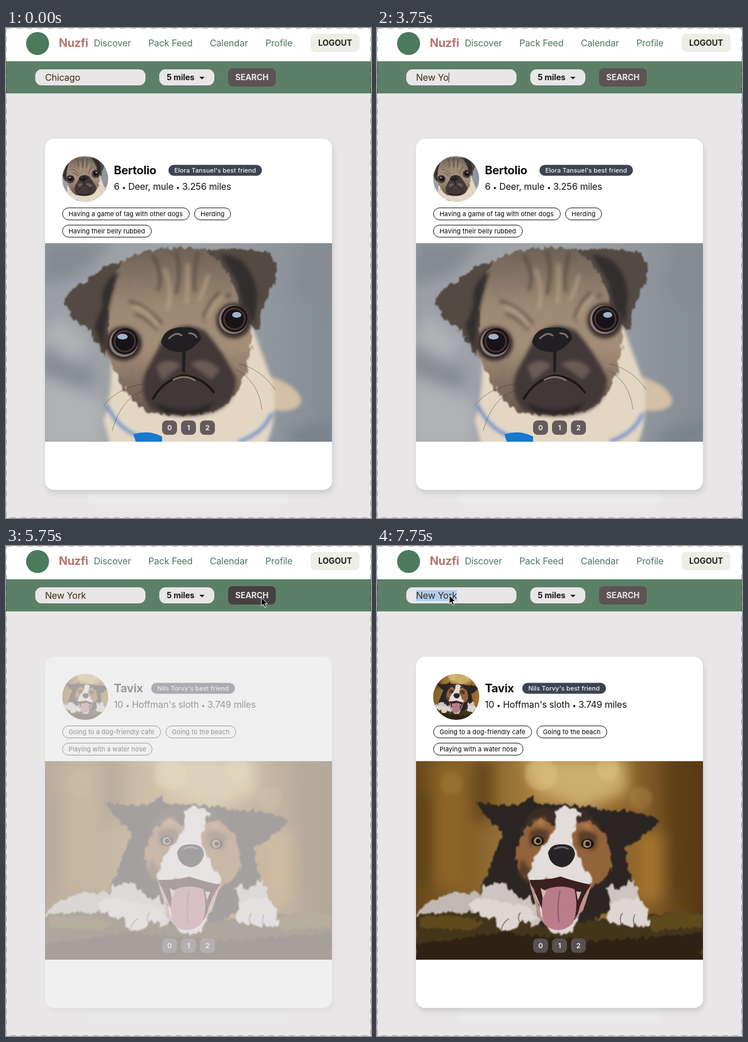
Animation, 636 px wide and 854 px high, one loop 8000 ms. Source, as an HTML page:

```html
<!DOCTYPE html>
<html lang="en">
<head>
<meta charset="utf-8">
<title>Dog finder</title>
<style>
html, body { margin: 0; width: 100%; height: 100%; overflow: hidden; background: #e8e6e7 }
svg { display: block; width: 100%; height: 100% }
text { font: 16px Inter, Roboto, sans-serif; letter-spacing: -.2px; white-space: pre }
.bold { font-size: 14px; font-weight: 700; letter-spacing: -.05px }
.title { font-size: 20px; font-weight: 700; letter-spacing: -.3px }
.small { font-size: 11px; letter-spacing: .1px }
.owner { font-weight: 500 }
.dot { font-size: 12px }
.mid { text-anchor: middle }
</style>
</head>
<body>
<svg viewBox="0 0 636 854">
<defs>
  <filter id="shadow" x="-10%" y="-10%" width="120%" height="120%"><feDropShadow dy="6" stdDeviation="5" flood-opacity=".12"/></filter>
  <filter id="soft" x="-30%" y="-30%" width="160%" height="160%"><feGaussianBlur stdDeviation="3"/></filter>
  <filter id="blur" x="-50%" y="-50%" width="200%" height="200%"><feGaussianBlur stdDeviation="12"/></filter>
  <filter id="hair" color-interpolation-filters="sRGB">
    <feTurbulence type="fractalNoise" baseFrequency=".12 .06" numOctaves="2" seed="4"/>
    <feDisplacementMap in="SourceGraphic" scale="14" xChannelSelector="R" yChannelSelector="G"/>
    <feGaussianBlur stdDeviation="1.2"/>
  </filter>
  <clipPath id="frame"><path d="M68 375h500v346H68z"/></clipPath>
  <clipPath id="round"><circle cx="138" cy="263" r="40"/></clipPath>
  <linearGradient id="street"><stop stop-color="#9b9fa5"/><stop offset=".5" stop-color="#a0a4a9"/><stop offset="1" stop-color="#848c95"/></linearGradient>
  <linearGradient id="forest"><stop stop-color="#69491c"/><stop offset=".45" stop-color="#aa8241"/><stop offset=".75" stop-color="#8c642b"/><stop offset="1" stop-color="#553616"/></linearGradient>
  <linearGradient id="fur" x2="0" y2="1"><stop stop-color="#6d6055"/><stop offset=".35" stop-color="#9c8974"/><stop offset=".6" stop-color="#a48e78"/><stop offset="1" stop-color="#65544a"/></linearGradient>

  <g id="pug" clip-path="url(#frame)">
    <path fill="url(#street)" d="M68 375h500v346H68z"/>
    <g filter="url(#blur)">
      <path fill="#868b93" d="M60 370h130l-60 60-70 20zM60 560l100 40-20 30-80-30zM520 370h60v130l-80-40z"/>
      <path fill="#b0b2b5" d="M60 610l110 40v80H60zM90 500l60 50-30 30-60-40z"/>
      <path fill="#79818a" d="M500 700l70-20v50H480z"/>
    </g>
    <g filter="url(#soft)">
      <path fill="#d3c0a6" d="M455 606q56 16 60 45-10 22-52 14z"/>
      <path fill="#e3d7c4" d="M184 565q0 90-14 118l12 45h270q22-40 13-110l-40-108z"/>
      <path fill="none" stroke="#4a86c8" stroke-width="6" d="M176 658q24 52 80 60M405 721q44-14 58-50"/>
    </g>
    <path fill="#1679cc" d="M222 708q28-8 50 4v12h-45z"/>
    <g filter="url(#hair)">
      <path fill="url(#fur)" d="M200 408q48-26 100-25 72-4 96 45 30 58 30 120-2 84-60 117-60 17-118 4-40-18-60-78-26-36-16-82 2-66 28-101z"/>
      <path fill="#544a44" d="M203 407q-38 4-65 35-33 14-35 36 6 30 38 45 18 20 29 50 12-30 6-76 4-58 27-90zM348 388q65-8 108 4 20 22 12 50-20 36-28 84-28-10-38-60-14-52-54-78z"/>
    </g>
    <g filter="url(#soft)" fill="none" stroke="#4a3f38" stroke-width="5" opacity=".7">
      <path d="M214 476q30 6 58 40M224 498q24 8 40 28M392 465q-34 8-46 46M372 460q-20 20-28 44M256 396q20 36 8 62M296 390q10 36 0 74M335 392q-10 38-6 68"/>
      <path stroke="#c3ad92" d="M222 486q24 4 42 34M380 468q-24 14-30 40M276 420q14 30 6 70M316 410q2 30-2 70M352 430q-4 20-16 46"/>
    </g>
    <path fill="#322d2d" filter="url(#soft)" d="M197 424q-34 20-29 60l-14 35 15 44q8-88 28-139zM374 395q54 0 64 70l-5 48q-22-18-30-70z"/>
    <g filter="url(#soft)">
      <path fill="#41373400" d="M0 0"/>
      <path fill="#433937" d="M275 540q28-34 72-12 32 36 54 82 0 46-42 60-52 10-104-4-26-28-12-66z"/>
      <path fill="#6a5c55" d="M262 590q20-18 42-2l-32 26zM322 586q26-16 50 10l-14 16z"/>
      <path fill="#2c2525" d="M258 652q56 26 106-2l-16 22q-36 8-74 0z"/>
      <ellipse cx="205" cy="550" rx="32" ry="30" fill="#352c29"/>
      <ellipse cx="397" cy="510" rx="31" ry="31" fill="#3d332f"/>
    </g>
    <path fill="#211f22" d="M270 548q6-28 40-26 28-2 30 20-12 16-27 22l-1 36h-5v-35q-28 0-37-17z"/>
    <g fill="none" stroke-linecap="round">
      <path stroke="#1c1819" stroke-width="4" d="M256 646q18-32 54-41 34 5 52 30"/>
      <path stroke="#81746b" stroke-width="3" d="M292 613q19-10 37 1M284 541q13-13 22-5M319 532q10 0 13 7"/>
    </g>
    <g fill="#857a77"><circle cx="205" cy="548" r="25"/><circle cx="396" cy="508" r="25"/></g>
    <g fill="#171319"><circle cx="207" cy="546" r="23"/><circle cx="398" cy="507" r="23"/></g>
    <g fill="none" stroke="#4b342a" stroke-width="3"><circle cx="207" cy="546" r="18"/><circle cx="398" cy="507" r="18"/></g>
    <g fill="#9fb3cc"><ellipse cx="203" cy="538" rx="9" ry="5"/><ellipse cx="402" cy="500" rx="8" ry="5"/></g>
    <path fill="none" stroke="#332c2b" stroke-width=".7" opacity=".7" d="M242 620q-46 6-72 38M240 632q-40 14-55 70M400 595q40 20 46 70M405 585q40 10 64 45"/>
  </g>

  <g id="collie" clip-path="url(#frame)">
    <path fill="url(#forest)" d="M68 375h500v346H68z"/>
    <g filter="url(#blur)">
      <path fill="#5a3c16" opacity=".7" d="M165 370h38v110h-38zM500 370h70v250h-55zM68 430h45v160H68z"/>
      <path fill="#cbae70" d="M255 370h180v60l-80 30-75-35z"/>
      <path fill="#8d6525" d="M100 375h55v220h-55z"/>
      <path fill="#a5742f" d="M455 500h40v120h-40z"/>
    </g>
    <g fill="#e3c886" opacity=".45" filter="url(#soft)"><circle cx="286" cy="398" r="28"/><circle cx="402" cy="388" r="20"/><circle cx="460" cy="440" r="20" opacity=".4"/><circle cx="130" cy="414" r="20" opacity=".25"/></g>
    <g filter="url(#hair)">
      <path fill="#c0b8b3" d="M68 640q35-40 110-36l50 40H68z"/>
      <path fill="#43351a" d="M68 643q80-10 170 2l160 5q90-12 170-10v90H68z"/>
      <path fill="#2d2213" d="M68 694l150-20 160 15 190-14v50H68z"/>
      <path fill="#5f4a1e" d="M75 648q60-12 110 8l-20 14-90-5zM474 648q50-14 94-4v20l-90 6z"/>
      <path fill="#2b2523" d="M270 448q-42 26-58 72l-32 82 36 26 70 34 90-10 54-34 14-34-24-84-40-46z"/>
      <path fill="#cdc5c1" d="M186 592l34-4 52 44 6 20-100-20zM400 594l48-12 12 44-52 12zM268 610l20 44-20 10-24-40z"/>
      <path fill="#2a2422" d="M173 447q46 8 78 2l18-12 18 24-38 62-30 50-24 6 24-82q-26-14-46-50zM493 478q-44-18-77-17l-32 2-10 20 24 44 16 72 22-7-2-68q36-18 59-46z"/>
      <path fill="#3a2c24" d="M270 462q46-16 96 0l28 28-20 20H270l-20-14z"/>
      <path fill="#93633a" d="M262 490l22-14 26 10 36-2 24-6 28 24q14 38 9 70l-33 24-106-10q-26-18-26-48 4-26 20-48z"/>
    </g>
    <g filter="url(#soft)">
      <path fill="#5a3d28" d="M266 498q16-10 34 0l-4 24h-30zM350 500q20-10 34 6l-4 24-28-6zM252 544l18 26-4 20-20-20z"/>
      <path fill="#b27a48" d="M268 480l26-6-4 16zM348 484l20-2 8 16z"/>
    </g>
    <g filter="url(#hair)">
      <path fill="#e2dcda" d="M312 460q28-10 44 4-20 28-14 56 12 34 35 60l-14 20-52-20-45 6q-4-31 25-66 25-24 21-60z"/>
      <path fill="#e0d8d2" d="M267 590l25 71q27 30 53 3l25-66-20 0-72-2z"/>
      <path fill="#ddd6d2" d="M170 614q38 0 67 10 38 2 40 26-12 8-27 3-8 22-33 19-16-10-9-23-38 0-45-22zM407 625q20-17 55-6 14 14 11 40-12 9-25 0-12 8-23-2-20 4-25-7z"/>
    </g>
    <path fill="#3a2020" d="M266 582q35 0 53-6 30 10 53 14-10 42-28 62-25 24-48 1z"/>
    <path fill="#c4908c" d="M265 584q12 20 21 61l8 10-12-8zM374 589q-18 24-24 52l-8 11 17-17z"/>
    <path fill="#b97d8b" d="M291 600q26-12 53-2 8 34-3 60-24 22-49 2-9-26-1-60z"/>
    <path fill="none" stroke="#90566a" stroke-width="2" d="M319 600q-6 26-2 56"/>
    <path fill="#cfc0ab" d="M285 596l4 18 6-12zM347 602l3 16 6-15z"/>
    <path fill="#262226" d="M298 535q4-16 24-15 22-1 23 18-5 20-23 22-21-3-24-25z"/>
    <path fill="none" stroke="#68636b" stroke-width="3" d="M309 528q13-6 25 0"/>
    <g fill="#211813"><ellipse cx="280" cy="514" rx="11" ry="9"/><ellipse cx="367" cy="519" rx="11" ry="9"/></g>
    <g fill="#a08763"><circle cx="280" cy="514" r="7"/><circle cx="366" cy="519" r="7"/></g>
    <g fill="#161318"><circle cx="281" cy="514" r="4"/><circle cx="367" cy="519" r="4"/></g>
    <path fill="none" stroke="#8e817b" stroke-width="2" d="M217 670q0-12 13-21M248 654q-4-8 2-15M425 658q-3-12 3-18M448 661q-3-12 2-19"/>
  </g>
</defs>

<rect width="636" height="854" fill="#e8e6e7"/>
<rect width="636" height="58" fill="#fff"/>
<rect y="58" width="636" height="56" fill="#5b8067"/>
<circle cx="55" cy="27" r="20" fill="#4b7a5d"/>
<text class="title" x="92" y="33" fill="#b8736f">Nuzfi</text>
<g fill="#4f7560"><text x="153" y="32">Discover</text><text x="248" y="32">Pack Feed</text><text x="355" y="32">Calendar</text><text x="452" y="32">Profile</text></g>
<rect x="531" y="10" width="85" height="32" rx="8" fill="#edeee6"/>
<text class="bold mid" x="573.5" y="31" fill="#20231b">LOGOUT</text>
<rect x="51" y="72" width="192" height="28" rx="11" fill="#e8e6e7"/>
<rect id="mark" x="68" y="77" height="19" fill="#aecff3"/>
<text id="city" x="68" y="92" fill="#432c12"></text>
<rect id="caret" y="78" width="1" height="17" fill="#432c12"/>
<rect x="267" y="72" width="96" height="28" rx="11" fill="#e8e6e7"/>
<text class="bold" x="280" y="91" fill="#181818">5 miles</text>
<path d="M337 85h9l-4.5 4.5z" fill="#181818"/>
<g id="search"><rect id="face" x="387" y="70" width="83" height="32" rx="8"/><text class="bold mid" x="428.5" y="91" fill="#e8e6e7">SEARCH</text></g>
<g id="cards"></g>
<rect x=".5" y=".5" width="635" height="853" fill="none" stroke="#000" stroke-opacity=".32" stroke-dasharray="10 8"/>
<path id="cursor" d="M0 0v14.500l3.400-3 2.500 5.500 2.500-1.100-2.400-5.400h4.600z" stroke="#fff"/>
</svg>
<script>
const LOOP = 8000, STEP = 250;
const $ = id => document.getElementById(id);
const clamp = v => Math.max(0, Math.min(1, v));

const box = (x, y, w, h, r, attrs) => `<rect x="${x}" y="${y}" width="${w}" height="${h}" rx="${r}" ${attrs}/>`;
const tag = ([x, y, w, label]) => box(x + .5, y + .5, w - 1, 21, 10.5, 'fill="none" stroke="#111"') +
  `<text class="small" x="${x + 11}" y="${y + 15}">${label}</text>`;
const badge = i => box(272 + 33 * i, 684, 26, 25, 8, 'fill="#5c5355" fill-opacity=".94"') +
  `<text class="mid" x="${285 + 33 * i}" y="701" fill="#e8e6e7" style="font-size:12px;font-weight:700">${i}</text>`;

const card = d => `<g id="${d.photo}Card">
  ${box(143, 740, 350, 91, 12, 'fill="#ebeaea"')}
  ${box(68, 193, 500, 612, 16, 'fill="#fff" filter="url(#shadow)"')}
  <g clip-path="url(#round)"><use href="#${d.photo}" transform="translate(138 263) scale(.2312) translate(-318 -548)"/></g>
  <text class="title" x="188" y="255" fill="#111">${d.name}</text>
  ${box(d.pill[0], 238.5, d.pill[1], 19, 9.5, 'fill="#3d4451"')}
  <text class="small owner mid" x="${d.pill[0] + d.pill[1] / 2}" y="252" fill="#f4f4f5">${d.owner}'s best friend</text>
  <text x="188" y="282" fill="#111">${d.info.join(' <tspan class="dot">•</tspan> ')}</text>
  ${d.tags.map(tag).join('')}
  <use href="#${d.photo}"/>
  ${[0, 1, 2].map(badge).join('')}</g>`;

$('cards').innerHTML = card({
  photo: 'pug', name: 'Bertolio', owner: 'Elora Tansuel', pill: [283, 163],
  info: ['6', 'Deer, mule', '3.256 miles'],
  tags: [[98, 313, 222, 'Having a game of tag with other dogs'], [328, 313, 64, 'Herding'], [98, 343, 156, 'Having their belly rubbed']]
}) + card({
  photo: 'collie', name: 'Tavix', owner: 'Nils Torvy', pill: [253, 146],
  info: ['10', "Hoffman's sloth", '3.749 miles'],
  tags: [[98, 313, 172, 'Going to a dog-friendly cafe'], [278, 313, 123, 'Going to the beach'], [98, 343, 157, 'Playing with a water hose']]
});

// Pointer stops: time, x, y
const stops = [[750, 180, 23], [1750, 102, 84], [3000, 102, 84], [4000, 452, 90], [4250, 452, 90],
  [4500, 445, 90], [6000, 445, 90], [6750, 211, 79], [7500, 126, 86], [8000, 126, 86]];

function pointer(t) {
  const i = Math.max(1, stops.findIndex(s => s[0] > t));
  const [a, b] = [stops[i - 1], stops[i]];
  const p = clamp((t - a[0]) / (b[0] - a[0])), e = p * p * (3 - 2 * p);
  return [a[1] + (b[1] - a[1]) * e, a[2] + (b[2] - a[2]) * e];
}

function draw(now) {
  const t = Math.floor(now % LOOP / STEP) * STEP;
  const typing = t >= 3000 && t < 4000;
  const show = (id, on) => $(id).setAttribute('visibility', on ? 'visible' : 'hidden');

  $('city').textContent = t < 3000 ? 'Chicago' : 'New York'.slice(0, [1, 2, 4, 6][(t - 3000) / STEP] || 8);
  const width = $('city').getComputedTextLength();
  $('mark').setAttribute('width', width);
  $('caret').setAttribute('x', 68 + width);
  show('mark', t >= 2000 && t < 3000 || t >= 7750);
  show('caret', typing);
  show('cursor', t >= 750 && !typing);
  $('cursor').setAttribute('transform', `translate(${pointer(t)})`);

  $('face').setAttribute('fill', t >= 4500 && t < 6250 ? '#464041' : '#5c5355');
  const zoom = t === 5000 ? 1.02 : 1;
  $('search').setAttribute('transform', `translate(428.5 86) scale(${zoom}) translate(-428.5 -86)`);

  $('pugCard').setAttribute('opacity', clamp((5500 - t) / 500));
  $('collieCard').setAttribute('opacity', clamp((t - 5500) / 700));
}

function loop(now) {
  draw(now);
  requestAnimationFrame(loop);
}
draw(0);
requestAnimationFrame(loop);
</script>
</body>
</html>
```
